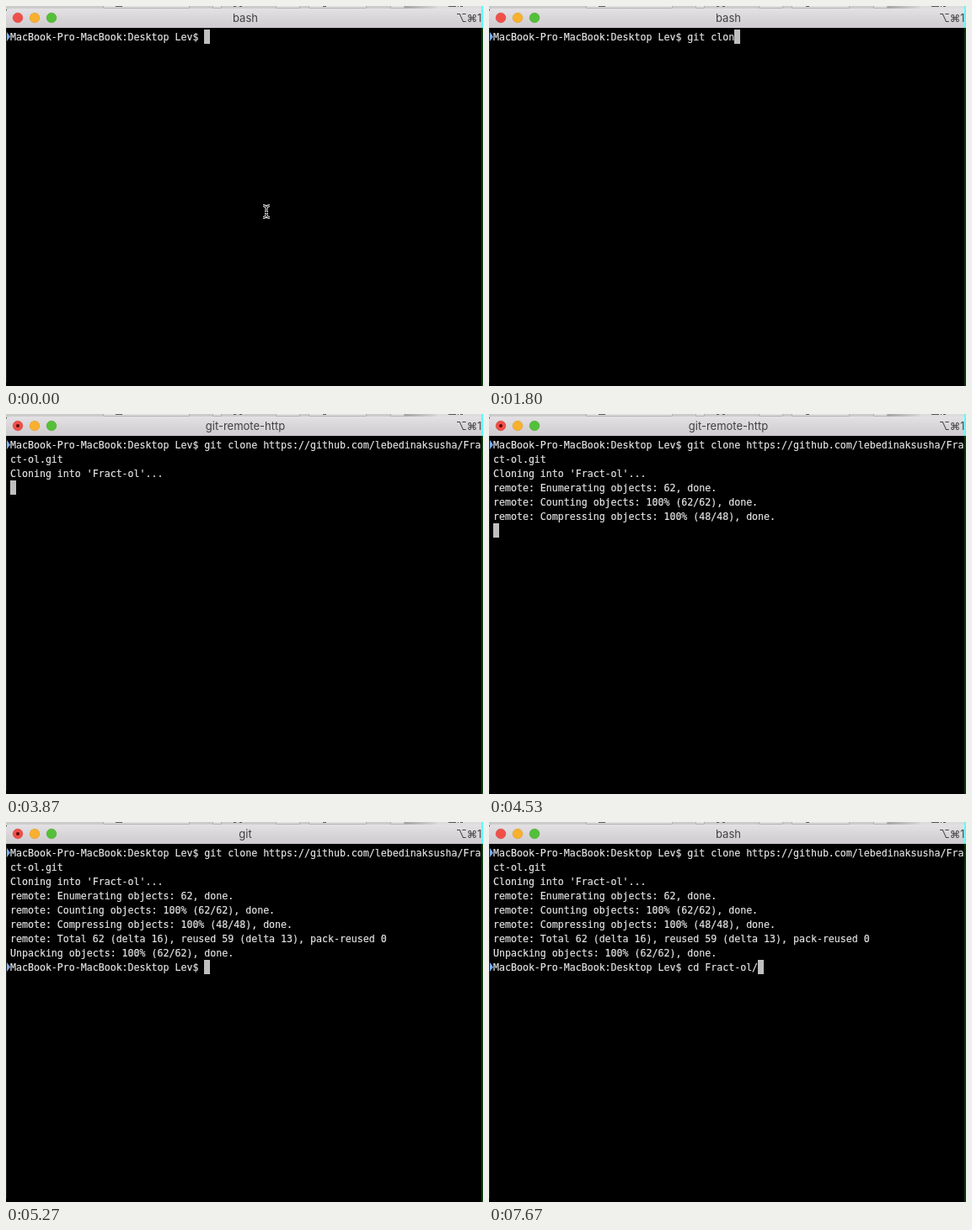
Recreate the animation shown at these times as an HTML page. Size 566 px wide and 452 px high, loop 8 s.

```html
<!DOCTYPE html>
<html lang="en">
<head>
<meta charset="utf-8">
<style>
html, body { margin: 0; width: 100%; height: 100%; overflow: hidden; background: #000; }
svg, pre, #cursor { position: absolute; left: 0; top: 0; }
pre { left: 5px; top: 29px; margin: 0; color: #e2e2e2; font: 11.6px/17px "DejaVu Sans Mono", monospace; -webkit-text-stroke: .2px; }
#cursor { width: 7px; height: 17px; background: #bfbfbf; }
text { font: 13px Inter, "DejaVu Sans", sans-serif; fill: #404040; }
#keys { font-size: 12.5px; }
</style>
</head>
<body>
<svg width="566" height="452">
  <defs>
    <linearGradient id="bar" x2="0" y2="1"><stop stop-color="#e4e1e4"/><stop offset="1" stop-color="#cecbce"/></linearGradient>
    <linearGradient id="shade"><stop stop-color="#a4a4a4"/><stop offset="1" stop-color="#d6d6d6"/></linearGradient>
  </defs>
  <path fill="#cbcbcb" d="M0 0H566V4H0z"/>
  <path fill="#dedede" stroke="#b0b0b0" d="M115.5-1H217.5V2.5H115.5zM245.5-1H255.5V2.5H245.5zM320.5-1H348.5V2.5H320.5zM359.5-1H427.5V2.5H359.5zM456.5-1H472.5V2.5H456.5z"/>
  <path fill="url(#shade)" d="M473 0H511V3H473z"/>
  <path fill="#dcdcdc" d="M511 0H566V3H511z"/>
  <path stroke="#555" d="M130 .5H138M270 .5H273M277 .5H280M376 .5H380M525 .5H534M536 .5H537M539 .5H542"/>
  <path fill="url(#bar)" d="M0 26V7Q0 3 4 3H566V26z"/>
  <g stroke-width=".6">
    <circle cx="14" cy="14" r="5.8" fill="#f04f49" stroke="#d83e38"/>
    <circle cx="34" cy="14" r="5.8" fill="#f8b02e" stroke="#dc9a25"/>
    <circle cx="54" cy="14" r="5.8" fill="#54c038" stroke="#43a52c"/>
  </g>
  <circle id="dot" cx="14" cy="14" r="2" fill="#5e0907"/>
  <text id="title" x="284" y="19" text-anchor="middle"></text>
  <text id="keys" x="534" y="19">⌥⌘1</text>
  <path fill="#242424" d="M0 26H1V448H0z"/>
  <path fill="#5ff" d="M564 0H566V26H564z"/>
  <path fill="#083c0a" d="M564 26H566V452H564z"/>
  <g fill="#78aef2">
    <path d="M1 31L5 36.5 1 42z"/>
    <path id="mark" d="M1 167L5 172.5 1 178z"/>
  </g>
  <g id="pointer" fill="none">
    <path id="beam" d="M305 237.5Q309 237.5 309 240.5V248.5Q309 251.5 305 251.5M313 237.5Q309 237.5 309 240.5M309 248.5Q309 251.5 313 251.5M307 245.5H311"/>
    <use href="#beam" stroke="#eee" stroke-width="3"/>
    <use href="#beam" stroke="#000"/>
  </g>
</svg>
<div id="cursor"></div>
<pre id="screen"></pre>
<script>
const $ = id => document.getElementById(id);
const show = (id, on) => $(id).style.display = on ? '' : 'none';
const prompt = 'MacBook-Pro-MacBook:Desktop Lev$ ';
const clone = 'git clone https://github.com/lebedinaksusha/Fract-ol.git';
const COLS = 80, CELL = 6.984, ROW = 17, TOTAL = 62;

// Each entry: [time, number of characters visible from then on]
const cloneKeys = [[70, 1], [330, 2], [530, 3], [670, 4], [1000, 5], [1130, 6], [1330, 7],
  [1800, 8], [2000, 9], [2200, 10], [2530, clone.length]];
const cdKeys = [[6330, 1], [6400, 2], [6670, 3], [7330, 4], [7400, 5], [7670, 12]];
const titles = [[0, 'bash'], [3870, 'git-remote-http'], [4600, 'git'], [6070, 'bash']];

const output = [
  [2930, "Cloning into 'Fract-ol'..."],
  [4400, 'remote: Enumerating objects: 62, done.'],
  [4470, 'remote: Counting objects: 100% (62/62), done.'],
  [4530, 'remote: Compressing objects: 100% (48/48), done.'],
  [4600, 'remote: Total 62 (delta 16), reused 59 (delta 13), pack-reused 0']
];

const latest = (list, t, start) => list.reduce((v, [at, next]) => t >= at ? next : v, start);
const typed = (text, keys, t) => prompt + text.slice(0, latest(keys, t, 0));

function unpacking(t) {
  const done = t >= 5000;
  const n = done ? TOTAL : 10 * Math.floor((t - 4600) / 66.5);
  const percent = String(Math.floor(100 * n / TOTAL)).padStart(3);
  return `Unpacking objects: ${percent}% (${n}/${TOTAL})${done ? ', done.' : ''}`;
}

function draw(t) {
  const command = typed(clone, cloneKeys, t);
  const lines = [command.slice(0, COLS)];
  if (command.length > COLS) lines.push(command.slice(COLS));
  for (const [at, line] of output) if (t >= at) lines.push(line);
  if (t >= 4667) lines.push(unpacking(t));
  if (t >= 5270) lines.push(typed('cd Fract-ol/', cdKeys, t));

  let row = lines.length - 1, col = lines[row].length;
  if (t >= 2870 && t < 5270) {
    col = 0;
    if (t < 4667 || t >= 5000) row++;
  }
  $('screen').textContent = lines.join('\n');
  $('cursor').style.transform = `translate(${Math.floor(5 + CELL * col)}px, ${28 + ROW * row}px)`;
  $('title').textContent = latest(titles, t);
  show('dot', t >= 3870 && t < 6070);
  show('mark', t >= 5270);
  show('pointer', t < 70);
}

function frame(now) {
  draw(now % 8000);
  requestAnimationFrame(frame);
}
draw(0);
requestAnimationFrame(frame);
</script>
</body>
</html>
```
